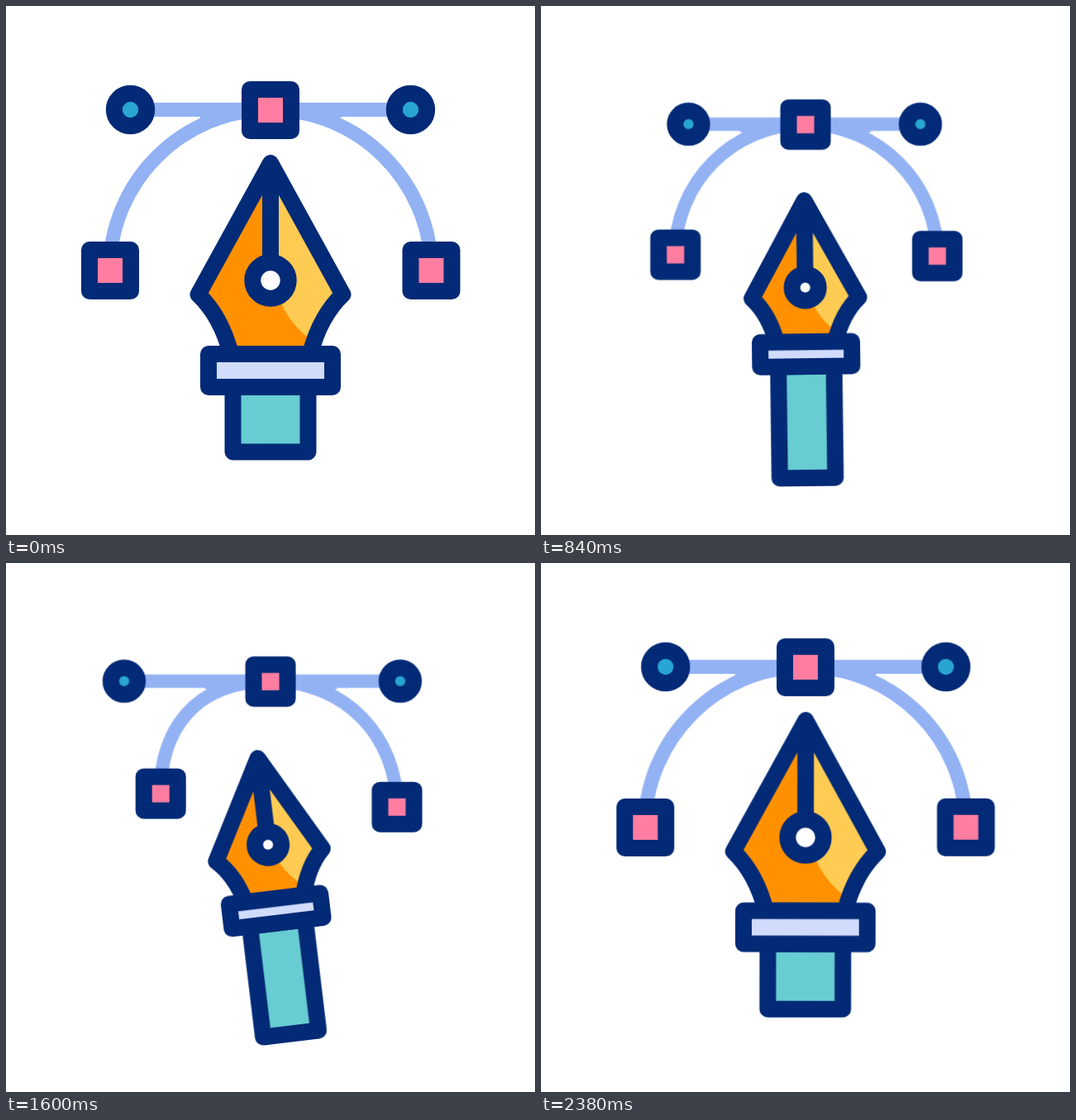
An HTML page without scripts that plays this animation: 640 by 640 pixels, repeating every 2400 ms.

```html
<!DOCTYPE html>
<html lang="en">
<head>
<meta charset="utf-8">
<title>Pen tool</title>
<style>
html, body { margin: 0; height: 100%; overflow: hidden; background: #fff; }
svg { display: block; width: 100%; height: 100%; }

.a { animation: 2.4s cubic-bezier(.3333, 0, .6667, 1) infinite; }
.ink { stroke: #032a76; stroke-width: 20; stroke-linejoin: round; stroke-linecap: round; }
.wires { fill: none; stroke: #93b2f4; stroke-width: 17; stroke-linecap: round; }
.dot { fill: #28a5d0; }
.box { fill: #ff7da1; }

/* Shapes shrink while their outlines keep their weight */
.rig { transform-origin: 320px 222.5px; animation-name: rig; }
.nib { transform-origin: 320px 365px; animation-name: nib; }
.turn { transform-origin: 320px 365px; animation-name: turn; }
.wires { animation-name: wires; }
.wire-l { animation-name: wire-l; }
.wire-r { animation-name: wire-r; }
.dot-l { animation-name: dot-l; }
.dot-r { animation-name: dot-r; }
.box-l { animation-name: box-l; }
.box-r { animation-name: box-r; }
.barrel { animation-name: barrel; }

@keyframes rig {
  0%, 8.3333%, 100% { transform: scale(1); stroke-width: 20; }
  33.3333%, 83.3333% { transform: scale(.82); stroke-width: 24.39; }
}
@keyframes wires {
  0%, 8.3333%, 100% { stroke-width: 17; }
  33.3333%, 83.3333% { stroke-width: 19.6; }
}
@keyframes nib {
  0%, 8.3333%, 100% { transform: scale(1); stroke-width: 20; }
  33.3333%, 83.3333% { transform: scale(.74); stroke-width: 27.03; }
}
@keyframes turn {
  0%, 33.3333%, 100% { transform: rotate(0deg); }
  45.8333%, 70.8333% { transform: rotate(-14deg); }
  58.3333%, 83.3333% { transform: rotate(14deg); }
}
@keyframes barrel {
  0%, 8.3333%, 100% { d: path("M274.5 461H365.5V539.5H274.5Z"); }
  33.3333%, 83.3333% { d: path("M286.3 436H353.7V571H286.3Z"); }
}
@keyframes dot-l {
  0%, 33.3333%, 58.3333%, 83.3333%, 100% { transform: translate(0px, 0px); }
  45.8333%, 70.8333% { transform: translate(-62.3px, 0px); }
}
@keyframes dot-r {
  0%, 33.3333%, 45.8333%, 70.8333%, 100% { transform: translate(0px, 0px); }
  58.3333%, 83.3333% { transform: translate(86px, 0px); }
}
@keyframes box-l {
  0%, 33.3333%, 58.3333%, 83.3333%, 100% { transform: translate(0px, 0px); }
  45.8333%, 70.8333% { transform: translate(43px, -38.5px); }
}
@keyframes box-r {
  0%, 33.3333%, 45.8333%, 70.8333%, 100% { transform: translate(0px, 0px); }
  58.3333%, 83.3333% { transform: translate(-31px, -34.6px); }
}
@keyframes wire-l {
  0%, 8.3333%, 100% { d: path("M150.5 125.5L320 125.5C212.6 125.5 125.5 212.6 125.5 320M241 129L290 129"); }
  33.3333%, 58.3333%, 83.3333% { d: path("M150.5 125.5L320 125.5C212.6 125.5 125.5 212.6 125.5 320M230 129L290 129"); }
  45.8333%, 70.8333% { d: path("M88.2 125.5L320 125.5C204 125.5 168.5 195 168.5 281.5M230 129L290 129"); }
}
@keyframes wire-r {
  0%, 8.3333%, 100% { d: path("M489.5 125.5L320 125.5C427.4 125.5 514.5 212.6 514.5 320M399 129L350 129"); }
  33.3333%, 45.8333%, 70.8333% { d: path("M489.5 125.5L320 125.5C427.4 125.5 514.5 212.6 514.5 320M410 129L350 129"); }
  58.3333%, 83.3333% { d: path("M575.5 125.5L320 125.5C443.8 125.5 483.5 195 483.5 285.4M417 129L350 129"); }
}
</style>
</head>
<body>
<svg viewBox="0 0 640 640">
  <g class="a ink rig">
    <g class="a wires">
      <path class="a wire-l" d="M150.5 125.5L320 125.5C212.6 125.5 125.5 212.6 125.5 320M241 129L290 129"/>
      <path class="a wire-r" d="M489.5 125.5L320 125.5C427.4 125.5 514.5 212.6 514.5 320M399 129L350 129"/>
    </g>
    <circle class="a dot dot-l" cx="150.5" cy="125.5" r="19.7"/>
    <circle class="a dot dot-r" cx="489.5" cy="125.5" r="19.7"/>
    <rect class="box" x="295" y="101" width="50" height="50"/>
    <rect class="a box box-l" x="101" y="295" width="50" height="50"/>
    <rect class="a box box-r" x="489.5" y="295" width="50" height="50"/>
  </g>

  <g class="a ink turn">
    <path class="a barrel" fill="#67cdd2" d="M274.5 461H365.5V539.5H274.5Z"/>
    <g class="a nib">
      <g stroke="none">
        <path fill="#ff9100" d="M320 190L232.5 349Q260 375 272 421H368Q380 375 407.5 349Z"/>
        <path fill="#ffcb52" d="M320 190L407.5 349Q384 371 372 406Q346 388 333 360L320 332Z"/>
      </g>
      <path fill="none" d="M320 190L232.5 349Q260 375 272 421H368Q380 375 407.5 349ZV315"/>
      <circle cx="320" cy="332" r="21.7" fill="#fff"/>
      <rect x="245" y="421" width="150" height="40" fill="#d1dcfd"/>
    </g>
  </g>
</svg>
</body>
</html>
```
